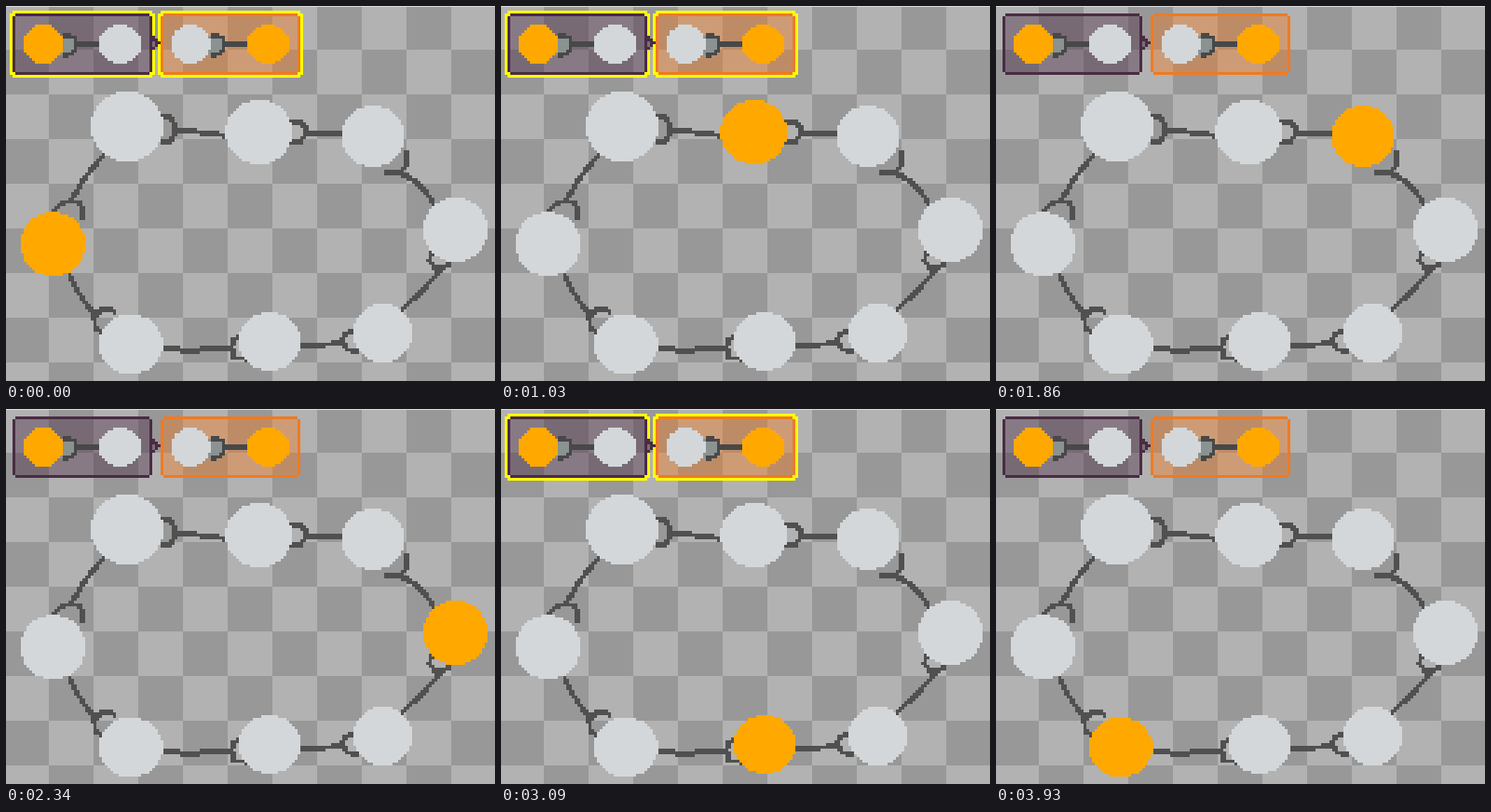
An HTML page that plays this animation: 525x403 px, repeating every 4130 ms.

```html
<!DOCTYPE html>
<html lang="en">
<head>
<meta charset="utf-8">
<title>Token passing around a ring</title>
<style>
  html, body { margin: 0; width: 100%; height: 100%; overflow: hidden; background: #b2b2b2; }
  svg { display: block; width: 525px; height: 403px; shape-rendering: crispEdges; }
  .node { fill: #d3d7da; }
  .token { fill: #ffa800; }
  .socket { fill: #8b9292; }
  .line { fill: none; stroke: #505050; stroke-width: 5.5; stroke-linejoin: round; }
  .small .line { stroke: #484848; stroke-width: 4.5; }
  .frame { fill: none; stroke-width: 3; }
  .before { stroke: #4a2c44; }
  .after { stroke: #f07a22; }
  .glow { fill: none; stroke: #ffff00; stroke-width: 4; }
</style>
</head>
<body>
<svg viewBox="0 0 525 403">
  <defs>
    <pattern id="checker" x="-2" y="-1" width="96" height="96" patternUnits="userSpaceOnUse">
      <rect width="96" height="96" fill="#b2b2b2"/>
      <path d="M48 0h48v48h-48zM0 48h48v48h-48z" fill="#989898"/>
    </pattern>
  </defs>
  <rect width="525" height="403" fill="url(#checker)"/>
  <rect width="525" height="1" fill="#dcdcdc"/>

  <g class="small">
    <rect x="10" y="11" width="144" height="60" fill="#4b2d46" fill-opacity=".42"/>
    <rect x="169" y="11" width="144" height="60" fill="#f47c20" fill-opacity=".4"/>
    <g id="glow">
      <rect class="glow" x="5.5" y="6.5" width="153" height="69" rx="6"/>
      <rect class="glow" x="164.5" y="6.5" width="153" height="69" rx="6"/>
    </g>
    <rect class="frame before" x="8.5" y="9.5" width="147" height="63" rx="4.5"/>
    <rect class="frame after" x="167.5" y="9.5" width="147" height="63" rx="4.5"/>
    <rect x="157" y="38" width="3" height="6" fill="#7d6c78"/>
    <path class="frame before" d="M157 34L164.5 40.5L157 47"/>
    <path class="socket" d="M58 32H70L76 38V46L70 53H58z"/>
    <path class="socket" d="M217 32H229L235 38V46L229 53H217z"/>
    <path class="line" d="M60 32L69 32Q75 34 75 41Q74 50 68 52L60 53M76 41H103"/>
    <path class="line" d="M219 32L228 32Q234 34 234 41Q233 50 227 52L219 53M235 41H262"/>
    <ellipse class="token" cx="40" cy="41" rx="21" ry="21"/>
    <ellipse class="node" cx="122.5" cy="41" rx="22.5" ry="21"/>
    <ellipse class="node" cx="198.5" cy="41" rx="21" ry="21"/>
    <ellipse class="token" cx="281.5" cy="41" rx="22.5" ry="21"/>
  </g>

  <g>
    <path class="line" d="M52 223Q54 213 64 211Q76 208 81 215L82 229M69 211L77 197Q88 177 108 158"/>
    <path class="line" d="M167 119L176 120L181 126V138L176 145L166 145M181 133L204 135L240 140"/>
    <path class="line" d="M304 125H316L321 130V138L317 145L305 146M321 137L363 138"/>
    <path class="line" d="M429 156V173L420 180L407 178M424 180Q446 188 461 216"/>
    <path class="line" d="M457 262L455 274L462 283L477 278M466 284Q451 303 424 327"/>
    <path class="line" d="M374 349L365 352L361 360L366 369L378 371M361 362L340 364L314 365"/>
    <path class="line" d="M251 354L244 359L242 367L245 378L258 379M242 367L212 368L208 370H188L184 368H166"/>
    <path class="line" d="M119 331L113 326H103L95 334L96 346L103 350M97 333Q78 312 67 288"/>
  </g>

  <g id="ring">
    <ellipse class="node" cx="50.5" cy="256" rx="35" ry="34.5"/>
    <ellipse class="node" cx="130" cy="129.5" rx="39" ry="37.5"/>
    <ellipse class="node" cx="271.5" cy="135.5" rx="36" ry="34.5"/>
    <ellipse class="node" cx="394" cy="140" rx="33.5" ry="33"/>
    <ellipse class="node" cx="482.5" cy="240.5" rx="34.5" ry="34.5"/>
    <ellipse class="node" cx="404.5" cy="351.5" rx="32" ry="31.5"/>
    <ellipse class="node" cx="283" cy="360.5" rx="33" ry="31.5"/>
    <ellipse class="node" cx="134" cy="363.5" rx="34.5" ry="32"/>
  </g>
</svg>
<script>
  const LOOP = 4130, CELL = 3, GRID_X = -2, GRID_Y = -1;
  // Each move: token arrives, glow starts to fade, glow is gone, number of fade steps.
  const moves = [
    [0, 60, 340, 5], [550, 620, 830, 4], [1030, 1100, 1380, 5], [1580, 1650, 1860, 4],
    [2070, 2140, 2340, 4], [2540, 2680, 2890, 4], [3090, 3160, 3370, 4], [3570, 3710, 3930, 4]
  ];
  const svg = document.querySelector('svg');
  const snap = (value, origin) => Math.floor((value - origin) / CELL) * CELL + origin;

  // Replaces a smooth shape by the coarse grid cells whose centres it covers.
  function pixelate(shape) {
    const { fill, stroke } = getComputedStyle(shape);
    const filled = fill !== 'none';
    const box = shape.getBBox(), margin = 2 * CELL;
    const point = svg.createSVGPoint();
    let d = '';
    for (let y = snap(box.y - margin, GRID_Y); y < box.y + box.height + margin; y += CELL) {
      for (let x = snap(box.x - margin, GRID_X); x < box.x + box.width + margin; x += CELL) {
        point.x = x + CELL / 2;
        point.y = y + CELL / 2;
        if (filled ? shape.isPointInFill(point) : shape.isPointInStroke(point)) {
          d += `M${x} ${y}h${CELL}v${CELL}h-${CELL}z`;
        }
      }
    }
    const cells = document.createElementNS(svg.namespaceURI, 'path');
    cells.setAttribute('d', d);
    cells.style.fill = filled ? fill : stroke;
    shape.replaceWith(cells);
  }

  function play(element, property, stops) {
    const frames = stops.map(([time, value]) =>
      ({ offset: time / LOOP, [property]: value, easing: 'step-end' }));
    element.animate(frames, { duration: LOOP, iterations: Infinity }).startTime = 0;
  }

  svg.querySelectorAll('[class]:not(g)').forEach(pixelate);

  const glowStops = [];
  for (const [start, fade, end, steps] of moves) {
    glowStops.push([start, 1]);
    for (let i = 1; i <= steps; i++) {
      glowStops.push([fade + (end - fade) * (i - 1) / (steps - 1), 1 - i / steps]);
    }
  }
  play(document.getElementById('glow'), 'opacity', [...glowStops, [LOOP, 0]]);

  const idle = '#d3d7da', active = '#ffa800';
  [...document.getElementById('ring').children].forEach((node, i) => {
    const start = moves[i][0];
    const end = i + 1 < moves.length ? moves[i + 1][0] : LOOP;
    const stops = [[start, active], [end, end < LOOP ? idle : active]];
    if (start > 0) stops.unshift([0, idle]);
    if (end < LOOP) stops.push([LOOP, idle]);
    play(node, 'fill', stops);
  });
</script>
</body>
</html>
```
